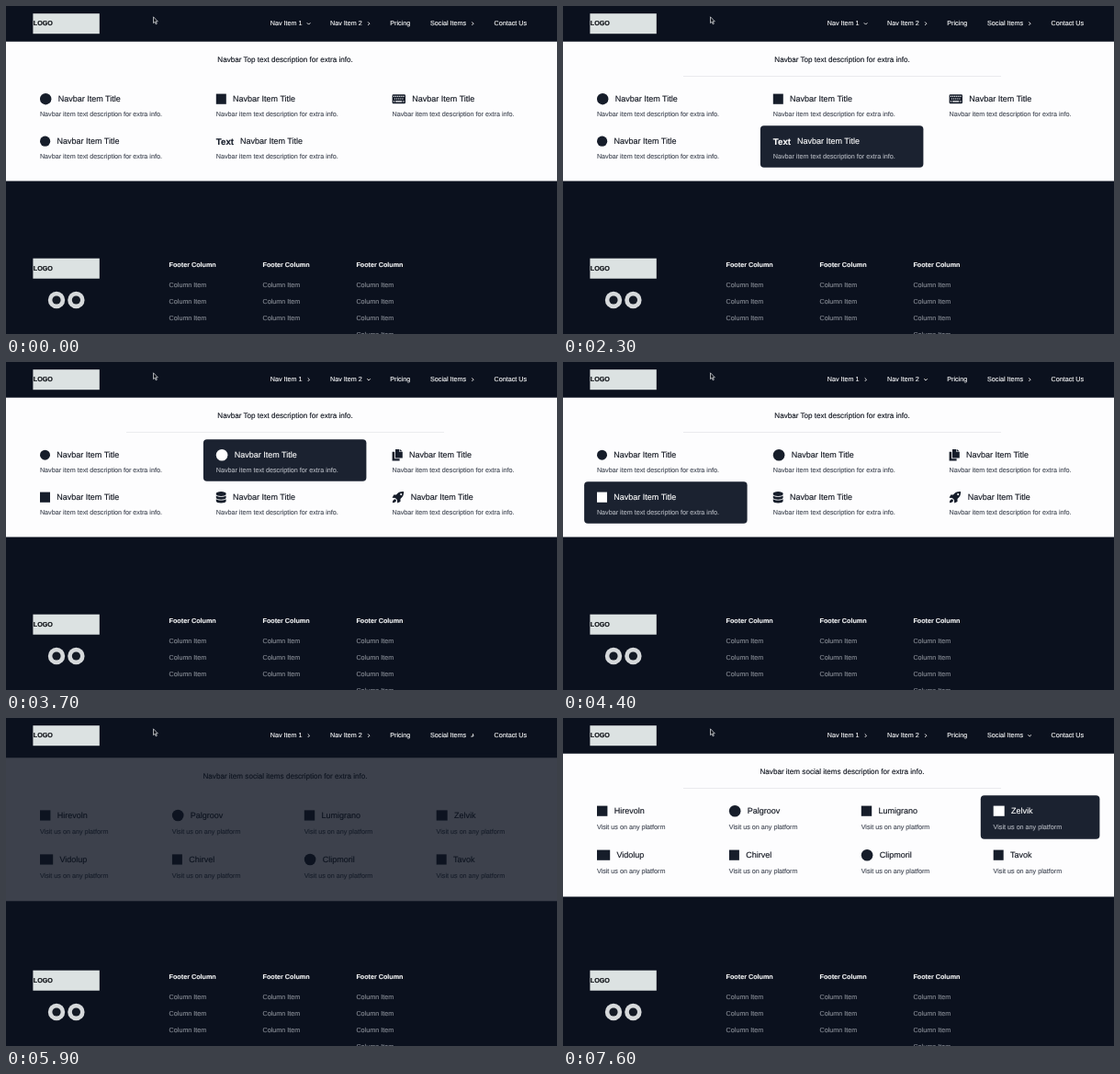
Animation of 600 by 357 pixels, one loop 8000 ms. Source, as an HTML page:

```html
<!DOCTYPE html>
<html lang="en">
<head>
<meta charset="utf-8">
<title>Navbar dropdowns</title>
<style>
  html, body { margin: 0; width: 100%; height: 100%; overflow: hidden; background: #0b111e; }
  svg { display: block; width: 600px; height: 357px; }
  text {
    font-family: "Liberation Sans", Arial, sans-serif; text-rendering: geometricPrecision; white-space: pre;
    fill: currentColor; stroke: currentColor; stroke-width: 0.14px;
  }
  .bold { font-weight: bold; }
  .card > rect { fill: none; }
  .card .mark { fill: #161d2a; color: #161d2a; }
  .card .title { color: #10151f; }
  .card .desc { color: #464c58; }
  .card.on > rect.back { fill: #1b2230; }
  .card.on .mark, .card.on .title { fill: #fff; color: #fff; }
  .card.on .desc { color: #aeb2ba; }
</style>
</head>
<body>
<svg id="stage" viewBox="0 0 600 357" xmlns="http://www.w3.org/2000/svg"></svg>
<script>
const LOOP = 8000, FADE = 250, DROP = 6;
const PANEL_TOP = 38.5;
const stage = document.getElementById('stage');

function add(parent, tag, attrs) {
  const el = document.createElementNS(stage.namespaceURI, tag);
  for (const k in attrs) el.setAttribute(k, attrs[k]);
  return parent.appendChild(el);
}

// cy is the middle of the capital letters
function label(parent, str, x, cy, size, attrs) {
  const el = add(parent, 'text', { x, y: cy + size * 0.358, 'font-size': size, ...attrs });
  el.textContent = str;
  return el;
}

const box = (x, y, w, h) => `M${x} ${y}h${w}v${h}h${-w}z`;

function keyboardPath() {
  let d = 'M1.2 1.3H13.2Q14.4 1.3 14.4 2.5V10.1Q14.4 11.3 13.2 11.3H1.2Q0 11.3 0 10.1V2.5Q0 1.3 1.2 1.3z';
  for (let i = 0; i < 6; i++) d += box(1.3 + i * 2.1, 2.9, 1.2, 1.2);
  for (let i = 0; i < 5; i++) d += box(2.3 + i * 2.1, 5.5, 1.2, 1.2);
  return d + box(1.3, 8.3, 1.2, 1.2) + box(3.5, 8.3, 7.2, 1.2) + box(11.8, 8.3, 1.2, 1.2);
}

function databasePath() {
  let d = 'M0 2.2C0 1 2.4 0 5.4 0S10.8 1 10.8 2.2V3C10.8 4.2 8.4 5 5.4 5S0 4.2 0 3z';
  for (const y of [4.5, 8.3])
    d += `M0 ${y}c2 1.7 8.8 1.7 10.8 0v2.3c0 1.2-2.4 2-5.4 2s-5.4-.8-5.4-2z`;
  return d;
}

const shapes = {
  keyboard: keyboardPath(),
  database: databasePath(),
  copy: 'M3.4 0H7.8V3.2H11.2V9.6H3.4zM8.5 0L11.2 2.6H8.5zM0 2.9H2.6V10.4H8V12.6H0z',
  rocket: 'M12.5.2C12.8 3.5 11.6 6.2 8.9 8.2V11L5.6 12.6 5.3 9.2 3.3 7.2 0 6.9 1.7 3.7H4.4C6.3 1 9-.1 12.5.2z' +
    'M9.6 2.1a1 1 0 1 0 .01 0zM2.8 8.4C4.6 8.6 4.7 10.7 3.6 11.4 2.6 12 1.4 12.2.3 12.3.3 11.2.6 9 2.8 8.4z'
};

function icon(parent, kind, x, cy, w) {
  const attrs = { class: 'mark' };
  if (kind === 'dot') add(parent, 'circle', { ...attrs, cx: x + w / 2, cy, r: w / 2 });
  else if (kind === 'block') add(parent, 'path', { ...attrs, d: box(x, cy - 5.6, w, 11.2) });
  else if (kind === 'word') label(parent, 'Text', x, cy, 9.7, { class: 'mark bold' });
  else add(parent, 'path', { ...attrs, d: shapes[kind], 'fill-rule': 'evenodd', transform: `translate(${x} ${cy - 6.3})` });
}

// ---- page ----
add(stage, 'rect', { width: 600, height: 357, fill: '#0b111e' });

function logo(y) {
  add(stage, 'rect', { x: 29.4, y, width: 72.4, height: 22, fill: '#dce2e2' });
  label(stage, 'LOGO', 29.8, y + 10.5, 7.2, { class: 'bold', color: '#080b10' });
}

logo(274.7);
for (const cx of [55, 76.4]) {
  add(stage, 'circle', { cx, cy: 320, r: 9.2, fill: '#d6d9db' });
  add(stage, 'circle', { cx, cy: 320, r: 4.6, fill: '#141a25' });
}
[3, 3, 4].forEach((rows, c) => {
  const x = 177.6 + c * 101.9;
  label(stage, 'Footer Column', x, 281, 7.2, { class: 'bold', color: '#f4f5f6' });
  for (let r = 0; r < rows; r++)
    label(stage, 'Column Item', x, 303.6 + r * 18, 7.2, { color: '#868b94' });
});

// ---- dropdown panels ----
const topText = 'Navbar Top text description for extra info.';
const itemText = 'Navbar item text description for extra info.';
const itemTitle = 'Navbar Item Title';

// items: [icon, icon width, title]; hover: [time, item]
const panels = [
  {
    open: -300, close: 2540, cols: 3, rowH: 46, heading: topText, desc: itemText,
    items: [['dot', 12.4], ['block', 11], ['keyboard', 14.4], ['dot', 11.2], ['word', 18.8]],
    hover: [[1000, 0], [1200, 1], [1500, 2], [1800, 3], [2200, 4], [2540, -1]]
  },
  {
    open: 2540, close: 5350, cols: 3, rowH: 46, heading: topText, desc: itemText,
    items: [['dot', 11], ['dot', 12.6], ['copy', 11.2], ['block', 11], ['database', 10.9], ['rocket', 12.8]],
    hover: [[3500, 1], [3900, 2], [4200, 3], [4600, 4], [5000, 5], [5350, -1]]
  },
  {
    open: 5850, close: 9000, cols: 4, rowH: 48,
    heading: 'Navbar item social items description for extra info.', desc: 'Visit us on any platform',
    items: [
      ['block', 11.4, 'Hirevoln'], ['dot', 12.6, 'Palgroov'], ['block', 11.4, 'Lumigrano'], ['block', 12, 'Zelvik'],
      ['block', 14.2, 'Vidolup'], ['block', 11, 'Chirvel'], ['dot', 12.6, 'Clipmoril'], ['block', 11, 'Tavok']
    ],
    hover: [[7000, 2], [7500, 3]]
  }
];

for (const p of panels) {
  p.el = add(stage, 'g', {});
  add(p.el, 'rect', { y: PANEL_TOP, width: 600, height: p.rowH * 2 + 60, fill: '#fdfdfe' });
  label(p.el, p.heading, 304, 57.9, 8.1, { 'text-anchor': 'middle', color: '#10151f' });
  p.rule = add(p.el, 'rect', { x: 131, y: 76, width: 346, height: 0.8, fill: '#e6e7ea' });
  const pitch = p.cols === 3 ? 191.8 : 143.9;
  p.cards = p.items.map(([kind, w, title = itemTitle], i) => {
    const x = 23.3 + (i % p.cols) * pitch;
    const y = 84.2 + Math.floor(i / p.cols) * p.rowH;
    const g = add(p.el, 'g', { class: 'card' });
    add(g, 'rect', { class: 'back', x: x - 0.2, y, width: pitch - 14.3, height: p.rowH - 0.4, rx: 4 });
    icon(g, kind, x + 13.7, y + 17, w);
    label(g, title, x + 21 + w, y + 16.8, 9, { class: 'title' });
    label(g, p.desc, x + 13.6, y + p.rowH / 2 + 10, 7.2, { class: 'desc' });
    return g;
  });
}

// ---- top bar ----
add(stage, 'rect', { width: 600, height: PANEL_TOP, fill: '#0b111e' });
logo(8.2);
const nav = [['Nav Item 1', 287.8, 329.6], ['Nav Item 2', 353, 395], ['Pricing', 418.2],
  ['Social Items', 462, 508.2], ['Contact Us', 531.6]];
const chevrons = [];
for (const [str, x, cx] of nav) {
  label(stage, str, x, 18.7, 7.2, { color: '#f6f7f8' });
  if (!cx) continue;
  const el = add(stage, 'path', { d: 'M-.9-1.8L.9 0-.9 1.8', fill: 'none', stroke: '#f6f7f8', 'stroke-width': 0.9 });
  chevrons.push({ el, x: cx });
}
add(stage, 'path', {
  d: 'M0 0V6.8L1.6 5.4 2.7 8 3.8 7.5 2.7 5H4.8z', transform: 'translate(160.5 11.8)',
  fill: '#10141c', stroke: '#eceef0', 'stroke-width': 0.7, 'stroke-linejoin': 'round'
});

// ---- timeline ----
const ramp = (t, from, to) => Math.min(1, Math.max(0, (t - from) / (to - from)));

function draw(t) {
  panels.forEach((p, i) => {
    const shown = ramp(t, p.open, p.open + FADE) * (1 - ramp(t, p.close, p.close + FADE));
    p.el.setAttribute('opacity', shown);
    p.el.setAttribute('transform', `translate(0 ${DROP * (1 - shown)})`);
    p.rule.setAttribute('opacity', ramp(t, p.open + 400, p.open + 1200));
    const past = p.hover.filter(h => t >= h[0]).pop();
    p.cards.forEach((card, n) => card.classList.toggle('on', !!past && past[1] === n));
    const turn = 90 * Math.min(1, shown * 1.8);
    chevrons[i].el.setAttribute('transform', `translate(${chevrons[i].x} 19.2) rotate(${turn})`);
  });
}

const start = performance.now();
function tick() {
  draw((performance.now() - start) % LOOP);
  requestAnimationFrame(tick);
}
tick();
</script>
</body>
</html>
```
